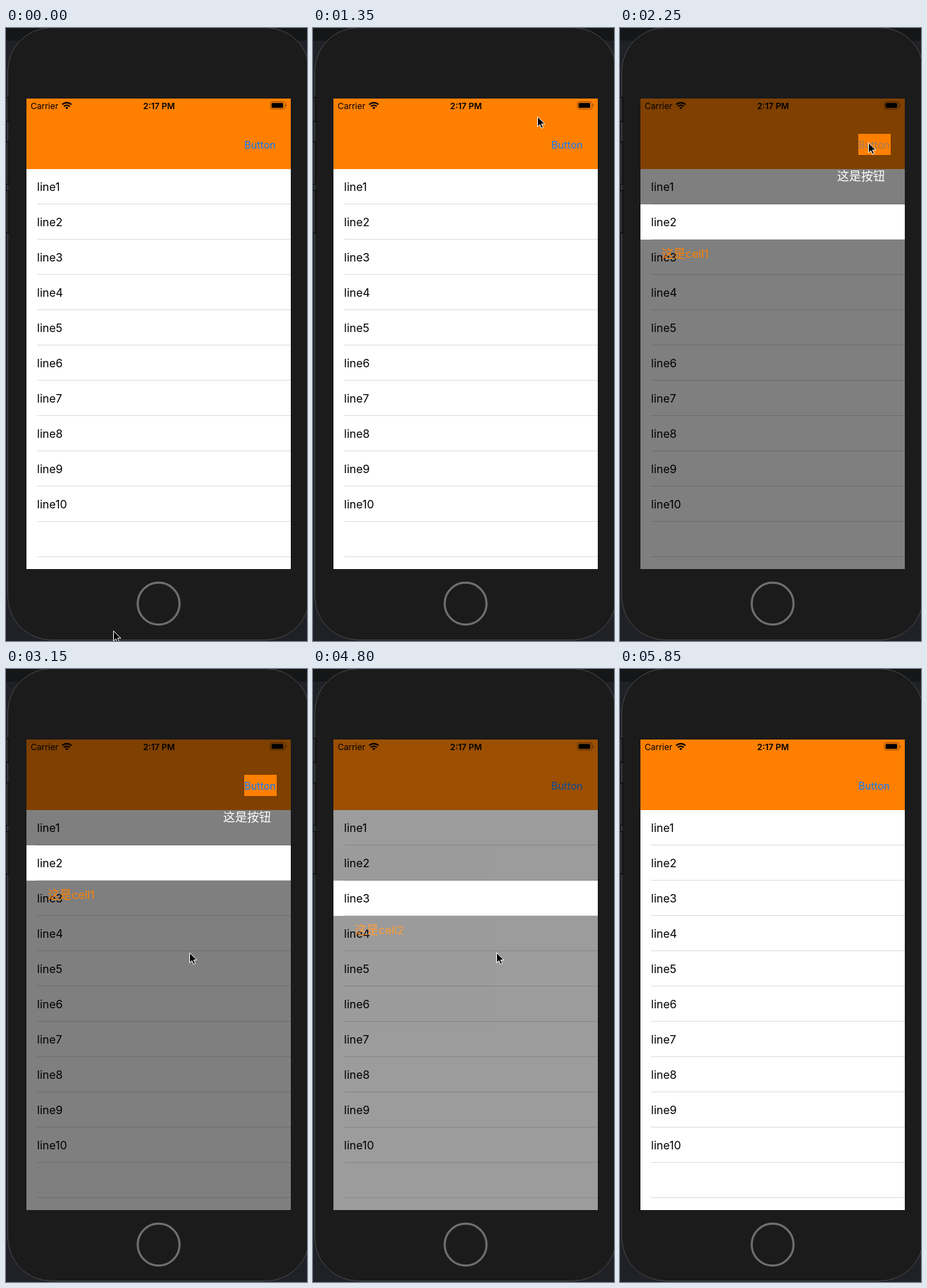
Animation of 427 by 869 pixels, one loop 6450 ms. Source, as an HTML page:

```html
<!DOCTYPE html>
<html lang="zh-CN">
<head>
<meta charset="utf-8">
<title>Guide overlay</title>
<style>
  html, body { margin: 0; width: 100%; height: 100%; overflow: hidden; background: #1f2024; }
  svg { display: block; width: 427px; height: 869px; }
  text { font-family: Inter, "Noto Sans CJK SC", "Noto Sans CJK", sans-serif; font-size: 16px; }
  .status text { font-size: 12px; }
  .button { font-size: 14.5px; fill: #0a7aff; }
  .tip { font-size: 17px; }
  .tip tspan { font-size: 16px; }
  .shade { fill: #000; fill-opacity: .5; fill-rule: evenodd; }
</style>
</head>
<body>
<svg viewBox="0 0 427 869">
  <!-- phone body -->
  <rect width="427" height="869" fill="#202126"/>
  <rect width="427" height="18" fill="#151618"/>
  <rect x="2.5" y="-.5" width="428" height="868" rx="62" fill="#1b1b1b" stroke="#48494b"/>
  <g fill="#2a2a2a" stroke="#060606">
    <rect x="-3" y="98.5" width="7" height="34"/>
    <rect x="-3" y="161.5" width="7" height="60"/>
    <rect x="-3" y="230.5" width="7" height="60"/>
  </g>
  <circle cx="216.5" cy="816" r="29.7" fill="none" stroke="#6f6f6f" stroke-width="3"/>

  <!-- screen -->
  <rect x="29" y="100" width="375" height="667" fill="#fff"/>
  <rect x="29" y="100" width="375" height="100" fill="#ff8000"/>
  <g class="status">
    <text x="35" y="114.5">Carrier</text>
    <text x="217" y="114.5" text-anchor="middle" font-weight="600">2:17 PM</text>
    <g fill="none" stroke="#000" stroke-width="2.1">
      <path d="M79.7 108.6a9.3 9.3 0 0 1 13.2 0M82.2 111.2a5.8 5.8 0 0 1 8.2 0"/>
      <path d="M86.3 115.2l-2.1-2.2a3 3 0 0 1 4.2 0z" fill="#000" stroke="none"/>
    </g>
    <rect x="375" y="104.5" width="21" height="10.5" rx="2.8" fill="none" stroke="#000" stroke-opacity=".4"/>
    <rect x="376.7" y="106.2" width="16.6" height="7.1" rx="1.5"/>
    <path d="M397.2 108v3.6q1.3-.5 1.3-1.8t-1.3-1.8" fill-opacity=".4"/>
  </g>
  <text id="button" class="button" x="338" y="170.5">Button</text>
  <g id="rows"></g>

  <!-- guide steps -->
  <g id="first">
    <path class="shade" d="M29 100h375v667h-375zM338 150h46v30h-46zM29 250h375v50h-375z"/>
    <text class="tip" x="308" y="216" fill="#fff">这是按钮</text>
    <text class="tip" x="59" y="326" fill="#ff8000">这是<tspan>cell1</tspan></text>
  </g>
  <g id="second">
    <path class="shade" d="M29 100h375v667h-375zM29 300h375v50h-375z"/>
    <text class="tip" x="59" y="376" fill="#ff8000">这是<tspan>cell2</tspan></text>
  </g>

  <path id="cursor" d="M.5 .8V15l3.3-3.1 2.2 5.2 2.5-1.1-2.2-5h4.6z" stroke="#fff"/>
</svg>
<script>
  const LOOP = 6450, TICK = 150;
  const byId = id => document.getElementById(id);
  const [button, rows, first, second, cursor] =
    ['button', 'rows', 'first', 'second', 'cursor'].map(byId);

  for (let i = 0; i < 11; i++) {
    const y = 200 + i * 50;
    rows.innerHTML += `<rect x="44" y="${y + 49}" width="360" height="1" fill="#dddddf"/>` +
      (i < 10 ? `<text x="44" y="${y + 31}">line${i + 1}</text>` : '');
  }

  const linear = u => u;
  const smooth = u => u * u * (3 - 2 * u);

  // Cursor legs: start tick, end tick, then a quadratic curve.
  const legs = [
    { start: 0, end: 7, x: [152, 178, 221], y: [854, 520, 189], ease: smooth },
    { start: 7, end: 9, x: [221, 272, 318], y: [189, 150, 125], ease: linear },
    { start: 9, end: 13, x: [318, 340, 352], y: [125, 79, 162], ease: linear },
    { start: 15, end: 21, x: [352, 322, 260], y: [162, 290, 401.5], ease: smooth },
    { start: 33, end: 38, x: [260, 262, 249], y: [401.5, 620, 823], ease: smooth }
  ];
  const curve = ([a, b, c], u) => (1 - u) ** 2 * a + 2 * u * (1 - u) * b + u * u * c;

  function draw(tick) {
    const leg = legs.filter(l => l.start <= tick).pop();
    const u = leg.ease(Math.min(1, (tick - leg.start) / (leg.end - leg.start)));
    cursor.setAttribute('transform', `translate(${curve(leg.x, u)} ${curve(leg.y, u)})`);
    cursor.style.opacity = tick < 39 ? 1 : 0;

    first.style.opacity = tick >= 15 && tick < 25 ? 1 : 0;
    second.style.opacity = tick < 25 || tick > 33 ? 0 : tick < 32 ? 1 : tick === 32 ? .78 : .125;
    button.style.opacity = tick === 15 ? .4 : tick === 16 ? .75 : 1;
  }

  const begin = performance.now();
  function play() {
    const time = Math.max(0, performance.now() - begin) % LOOP;
    draw(Math.floor(time / TICK));
    requestAnimationFrame(play);
  }
  play();
</script>
</body>
</html>
```
